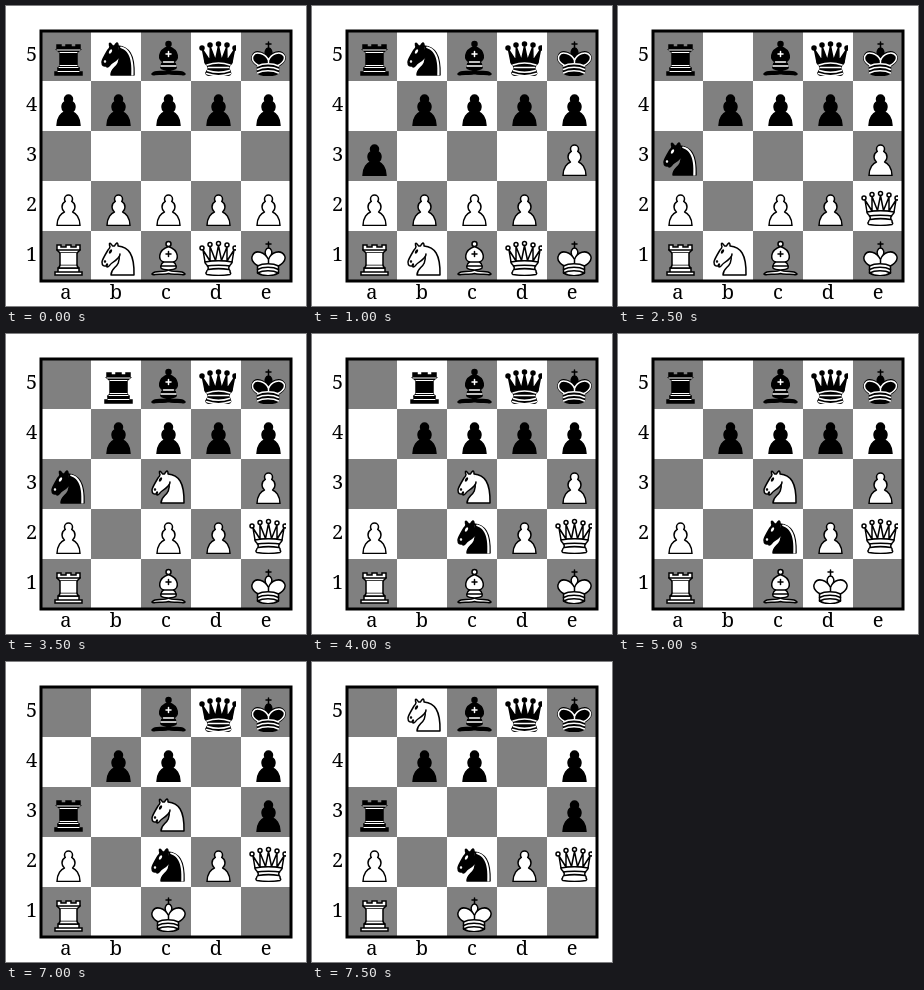
Recreate the animation shown at these times as an HTML page. Size 300x300 px, loop 8 s.

```html
<!DOCTYPE html>
<html>
<head>
<meta charset="utf-8">
<style>
html, body { margin: 0; width: 100%; height: 100%; overflow: hidden; background: #fff; }
svg { display: block; }
text { font: 20px "Noto Serif", serif; text-anchor: middle; }
.piece { stroke: #000; stroke-width: 1.5; stroke-linecap: round; stroke-linejoin: round; }
.w { fill: #fff; }
.b { fill: #000; }
.line { fill: none; }
.b .line { stroke: #fff; }
.b .thin { stroke-width: 1; }
.b .dark { stroke: #000; }
.dot { fill: #000; }
.b .dot { fill: #fff; stroke: #fff; }
.b .shine { fill: #fff; stroke: none; }
.bare { stroke: none; }
.sharp { stroke-linecap: butt; stroke-linejoin: miter; }
</style>
</head>
<body>
<svg width="300" height="300" viewBox="0 0 300 300">
  <g id="board"></g>
  <rect x="35" y="25" width="250" height="250" fill="none" stroke="#000" stroke-width="3"/>
  <g id="pieces"></g>
</svg>
<script>
const path = (d, cls = '') => `<path class="${cls}" d="${d}"/>`;
const circle = (x, y, r, cls = '') => `<circle class="${cls}" cx="${x}" cy="${y}" r="${r}"/>`;

const pawn = path('M22.5 9c-2.21 0-4 1.79-4 4 0 .89.29 1.71.78 2.38C17.33 16.5 16 18.59 16 21c0 2.03.94 3.84 2.41 5.03C15.41 27.09 11 31.58 11 39.5h23c0-7.92-4.41-12.41-7.41-13.47C28.06 24.84 29 23.03 29 21c0-2.41-1.33-4.5-3.28-5.62.49-.67.78-1.49.78-2.38 0-2.21-1.79-4-4-4z');

const bishop =
  path('M9 36c3.39-.97 10.11.43 13.5-2 3.39 2.43 10.11 1.03 13.5 2 0 0 1.65.54 3 2-.68.97-1.65.99-3 .5-3.39-.97-10.11.46-13.5-1-3.39 1.46-10.11.03-13.5 1-1.35.49-2.32.47-3-.5 1.35-1.46 3-2 3-2z', 'sharp') +
  path('M15 32c2.5 2.5 12.5 2.5 15 0 .5-1.5 0-2 0-2 0-2.5-2.5-4-2.5-4 5.5-1.5 6-11.5-5-15.5-11 4-10.5 14-5 15.5 0 0-2.5 1.5-2.5 4 0 0-.5.5 0 2z') +
  circle(22.5, 8, 2.5) +
  path('M17.5 26h10M15 30h15m-7.5-14.5v5M20 18h5', 'line');

const knight =
  path('M22 10c10.5 1 16.5 8 16 29H15c0-9 10-6.5 8-21') +
  path('M24 18c.38 2.91-5.55 7.37-8 9-3 2-2.82 4.34-5 4-1.04-.94 1.41-3.04 0-3-1 0 .19 1.23-1 2-1 0-4 1-4-4 0-2 6-12 6-12s1.89-1.9 2-3.5c-.73-1-.5-2-.5-3 1-1 3 2.5 3 2.5h2s.78-2 2.5-3c1 0 1 3 1 3') +
  circle(9, 25.5, .5, 'dot') +
  path('M14.93 15.75a.5 1.5 30 1 1-.86-.5.5 1.5 30 1 1 .86.5z', 'dot');
const mane = path('M24.55 10.4l-.45 1.45.5.15c3.15 1 5.65 2.49 7.9 6.75S35.75 29.06 35.25 39l-.05.5h2.25l.05-.5c.5-10.06-.88-16.85-3.25-21.34-2.37-4.49-5.79-6.64-9.19-7.16l-.51-.1z', 'shine');

const rookFoot = path('M9 39h27v-3H9zM12 36v-4h21v4z', 'sharp');
const whiteRook = rookFoot +
  path('M11 14V9h4v2h5V9h5v2h5V9h4v5', 'sharp') +
  path('M34 14l-3 3H14l-3-3') +
  path('M31 17v12.5H14V17', 'sharp') +
  path('M31 29.5l1.5 2.5h-20l1.5-2.5') +
  path('M11 14h23', 'line');
const blackRook = rookFoot +
  path('M12.5 32l1.5-2.5h17l1.5 2.5zM14 29.5v-13h17v13zM14 16.5L11 14h23l-3 2.5zM11 14V9h4v2h5V9h5v2h5V9h4v5z', 'sharp') +
  path('M12 35.5h21M13 31.5h19M14 29.5h17M14 16.5h17M11 14h23', 'line thin');

const gown = path('M9 26c0 2 1.5 2 2.5 4 1 1.5 1 1 .5 3.5-1.5 1-1.5 2.5-1.5 2.5-1.5 1.5.5 2.5.5 2.5 6.5 1 16.5 1 23 0 0 0 1.5-1 0-2.5 0 0 .5-1.5-1-2.5-.5-2.5-.5-2 .5-3.5 1-2 2.5-2 2.5-4-8.5-1.5-18.5-1.5-27 0z', 'sharp');
const whiteQueen =
  [[6, 12], [22.5, 7.5], [39, 12], [14, 8.5], [31, 9]].map(([x, y]) => circle(x, y, 2)).join('') +
  path('M9 26c8.5-1.5 21-1.5 27 0l2-12-7 11V11l-5.5 13.5-3-15-3 15-5.5-14V25L7 14z') + gown +
  path('M11.5 30c3.5-1 18.5-1 22 0M12 33.5c6-1 15-1 21 0', 'line');
const blackQueen =
  [[6, 12], [14, 9], [22.5, 8], [31, 9], [39, 12]].map(([x, y]) => circle(x, y, 2.75, 'bare')).join('') +
  path('M9 26c8.5-1.5 21-1.5 27 0l2.5-12.5L31 25l-.3-14.1-5.2 13.6-3-14.5-3 14.5-5.2-13.6L14 25 6.5 13.5z') + gown +
  path('M11 38.5a35 35 1 0 0 23 0', 'line dark') +
  path('M11 29a35 35 1 0 1 23 0M12.5 31.5h20M11.5 34.5a35 35 1 0 0 22 0M10.5 37.5a35 35 1 0 0 24 0', 'line');

const king =
  path('M22.5 11.63V6M20 8h5', 'line dark') +
  path('M22.5 25s4.5-7.5 3-10.5c0 0-1-2.5-3-2.5s-3 2.5-3 2.5c-1.5 3 3 10.5 3 10.5', 'sharp') +
  path('M11.5 37c5.5 3.5 15.5 3.5 21 0v-7s9-4.5 6-10.5c-4-6.5-13.5-3.5-16 4V27v-3.5c-3.5-7.5-13-10.5-16-4-3 6 5 10 5 10z');
const sash = path('M11.5 30c5.5-3 15.5-3 21 0m-21 3.5c5.5-3 15.5-3 21 0m-21 3.5c5.5-3 15.5-3 21 0', 'line');
const blackRobe = path('M32 29.5s8.5-4 6.03-9.65C34.15 14 25 18 22.5 24.5v2.1-2.1C20 18 9.9 14 7 19.85c-2.5 5.65 4.85 9 4.85 9', 'line');

// Upper case is white, lower case is black.
const shapes = {
  P: pawn, p: pawn, B: bishop, b: bishop, N: knight, n: knight + mane,
  R: whiteRook, r: blackRook, Q: whiteQueen, q: blackQueen,
  K: king + sash, k: king + blackRobe + sash
};

const files = 'abcde';
const setup = ['RNBQK', 'PPPPP', '', 'ppppp', 'rnbqk'];
const moves = 'e2e3 a4a3 b2a3 b5a3 d1e2 a5b5 b1c3 a3c2 e1d1 b5a5 c1a3 a5a3 d1c1 d4e3 c3b5'.split(' ');
const stepTime = 500;

const fileX = file => 35 + 50 * files.indexOf(file);
const rankY = rank => 275 - 50 * rank;

let squares = '';
for (const file of files) {
  squares += `<text x="${fileX(file) + 25}" y="292.5">${file}</text>`;
  for (let rank = 1; rank <= 5; rank++) {
    const dark = (files.indexOf(file) + rank) % 2;
    squares += `<rect x="${fileX(file)}" y="${rankY(rank)}" width="50" height="50" fill="${dark ? '#808080' : '#fff'}"/>`;
    if (file === 'a') squares += `<text x="25.5" y="${rankY(rank) + 29.5}">${rank}</text>`;
  }
}
document.getElementById('board').innerHTML = squares;

function position(step) {
  const men = {};
  setup.forEach((row, i) => [...row].forEach((man, j) => men[files[j] + (i + 1)] = man));
  for (const move of moves.slice(0, step)) {
    const from = move.slice(0, 2);
    men[move.slice(2)] = men[from];
    delete men[from];
  }
  return men;
}

// Each piece sits in a 40 px window that trims its edges.
const draw = ([square, man]) =>
  `<svg x="${fileX(square[0]) + 5}" y="${rankY(square[1]) + 5}" width="40" height="40" overflow="hidden">
    <g class="piece ${man < 'a' ? 'w' : 'b'}">${shapes[man]}</g></svg>`;

let shown = -1;
function frame() {
  const step = Math.floor(performance.now() / stepTime) % (moves.length + 1);
  if (step !== shown) {
    shown = step;
    document.getElementById('pieces').innerHTML = Object.entries(position(step)).map(draw).join('');
  }
  requestAnimationFrame(frame);
}
frame();
</script>
</body>
</html>
```
